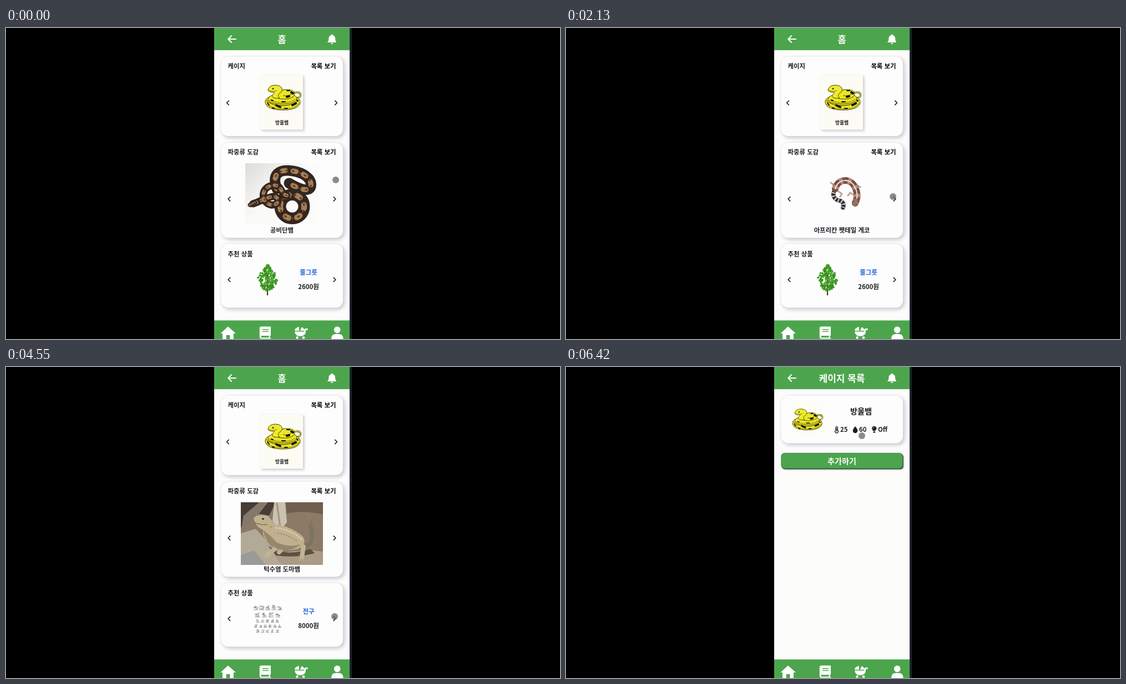
Write an HTML page that moves like this. It is 998 by 561 pixels and loops after 6.46 s.

```html
<!DOCTYPE html>
<html lang="ko">
<head>
<meta charset="utf-8">
<style>
html, body { margin: 0; width: 100%; height: 100%; overflow: hidden; background: #000; }
svg { display: block; }
text { font-family: "Noto Sans CJK KR", "Noto Sans CJK", "Noto Sans", sans-serif; font-weight: 700; }
.line { fill: none; stroke-linecap: round; stroke-linejoin: round; }
.card { fill: #fdfdfd; filter: drop-shadow(3px 3px 3px #bdbdcdb0) drop-shadow(0 0 1px #d4d4d8b0); }
</style>
</head>
<body>
<svg id="stage" width="100%" height="100%" viewBox="0 0 998 561"></svg>
<script>
const GREEN = '#4ca54d', INK = '#1c1c20';
const stage = document.getElementById('stage');

const line = (d, color, w, extra = '') =>
  `<path class="line" d="${d}" stroke="${color}" stroke-width="${w}" ${extra}/>`;
const shape = (d, color) => `<path d="${d}" fill="${color}"/>`;
const oval = (x, y, rx, ry, color, turn = 0) =>
  `<ellipse cx="${x}" cy="${y}" rx="${rx}" ry="${ry}" fill="${color}" transform="rotate(${turn} ${x} ${y})"/>`;
const rect = (x, y, w, h, color, r = 0, extra = '') =>
  `<rect x="${x}" y="${y}" width="${w}" height="${h}" rx="${r}" fill="${color}" ${extra}/>`;
const card = (y, h) => rect(387.5, y, 219.5, h, '#fdfdfd', 13, 'class="card"');
// y is the optical middle of the line
const text = (s, x, y, anchor = 'middle', size = 11.4, color = INK) =>
  `<text x="${x}" y="${y + size * .38}" font-size="${size}" text-anchor="${anchor}" fill="${color}">${s}</text>`;
const arrows = (l, r, y) =>
  line(`M${l + 1.8} ${y - 3.6}l-3.7 3.6 3.7 3.6M${r - 1.8} ${y - 3.6}l3.7 3.6 -3.7 3.6`, INK, 1.6);
const group = (id, body) => `<g id="${id}">${body}</g>`;
const photo = (x, y, w, h, body) =>
  `<svg x="${x}" y="${y}" width="${w}" height="${h}" viewBox="${x} ${y} ${w} ${h}">${body}</svg>`;

let seed = 7;
const rand = () => (seed = seed * 16807 % 2147483647) / 2147483647;

// Yellow rattlesnake drawing
const inked = (d, color = '#ebe522') =>
  `<path d="${d}" fill="${color}" stroke="#2c2c0c" stroke-width=".9" stroke-linejoin="round"/>`;
const snake =
  line('M517 126Q531 128 531 120Q528 114 518 117', '#55520f', 3) +
  line('M517 126Q531 128 531 120Q528 114 518 117', '#d9d54a', 1.7) +
  inked('M467 133C468 123 484 121 499 121C518 121 529 125 530 133C530 143 517 148 499 148C480 148 467 143 467 133Z') +
  line('M470 138Q482 147 505 146Q522 145 528 136', '#a8a11a', 2) +
  line('M469 131Q480 141 500 140Q521 139 527 129', '#2c2c0c', 1) +
  inked('M472 128C473 121 487 119 502 119C515 119 524 122 524 127C523 134 512 137 498 137C482 137 472 134 472 128Z') +
  line('M475 130Q486 135 500 134.5Q515 134 521 128', '#a8a11a', 1.5) +
  inked('M488 122C488 115 496 111 506 111C516 111 521 115 520 120C518 126 508 129 499 128C492 128 488 126 488 122Z') +
  inked('M472 112C473 105 481 102 489 103.5C497 105 500 111 495 116C490 119 489 122 493 127L482 126C477 122 481 119 484 116C480 116 473 116 472 112Z', '#f0ea2c') +
  oval(481, 109.5, 1.5, 1.3, '#181808') + line('M473 113Q481 115.5 488 113', '#554f10', .7) +
  line('M500 122Q508 124 514 119', '#2c2c0c', .9) +
  line('M487 139.5l7 3M516 139l6 -3M506 124l4 -1M514 116l3 2', '#11120a', 4) +
  line('M471 135l3 4M480 144l3 1M502 145l5 0M524 130l2 2M478 130l3 1M497 133l6 0M506 113l5 0', '#11120a', 2) +
  line('M524 115l6 6M528 114l3 5', '#5f5a14', .6);

const python =
  `<defs><linearGradient id="haze" x2="1" y2=".9"><stop stop-color="#dddcd8"/><stop offset=".5" stop-color="#fbfbfa"/></linearGradient></defs>` +
  rect(431, 244, 132, 109, 'url(#haze)') +
  [['M488 290C478 264 492 256 509 257C536 259 552 272 549 286C546 296 530 292 510 280', 19],
   ['M494 322A21 21 0 0 1 537 322A21 21 0 0 1 494 322', 21],
   ['M506 302C494 300 498 281 479 284C459 288 458 314 477 319C494 321 494 303 480 304C466 307 460 312 445 317', 13]]
    .map(([d, w]) => line(d, '#33261f', w) +
      line(d, '#a77d54', w * .48, `stroke-dasharray="${w * .3} ${w * .72}"`) +
      line(d, '#5b4030', w * .16, `stroke-dasharray="2 ${w * .5}"`)).join('') +
  oval(444, 317.5, 9, 5, '#3b2b23', -22) + line('M438 320l11 -6', '#96704b', 2);

const monitorBody = 'M449 304Q466 306 480 299C493 289 509 297 527 280Q542 269 561 271';
const monitor = photo(423, 245, 148, 111,
  rect(423, 245, 148, 111, '#dfe6ee') +
  shape('M423 245H571V290H490L478 286H423Z', '#8d6c32') +
  shape('M490 245H571V262L545 256L518 262L486 258Z', '#3b3a33') +
  oval(515, 270, 34, 12, '#a27f39', -14) + oval(480, 254, 16, 7, '#b18a3c', 10) +
  oval(442, 266, 21, 13, '#76993f') + oval(470, 273, 16, 10, '#8aa04d') + oval(440, 250, 20, 5, '#4a4a28') +
  shape('M423 286H484L470 306L440 314L423 316Z', '#f0efea') +
  shape('M423 322L446 312L474 318L492 338L476 356H423Z', '#b0705c') +
  shape('M463 294L491 278L526 280L549 276L571 284V340L549 346L526 336L510 316L487 320Z', '#b77360') +
  shape('M509 308L536 302L571 314V340L549 346L526 336Z', '#96594a') +
  shape('M426 331L447 317L466 326L447 338Z', '#c68b78') +
  shape('M436 348L468 337L484 340L474 356H430Z', '#91564a') +
  line('M481 306L485 326L479 336M511 293L526 306L535 307M469 308L462 319', '#846b4c', 6) +
  line(monitorBody, '#6f583d', 11) +
  line('M476 302C490 291 507 297 523 284', '#6f583d', 17) +
  line('M474 302C490 291 507 297 526 283', '#b59b6c', 11, 'stroke-dasharray="1 5.5" style="stroke-linecap:butt"') +
  line(monitorBody, '#a48a5f', 5, 'stroke-dasharray="2 3" style="stroke-linecap:butt"') +
  shape('M433 299L442 292L458 298L460 309L441 307Z', '#97794f') + oval(443, 298, 1.2, 1.2, '#1c1712'));

const geckoBody = 'M485 290C490 271 513 270 521 288C527 301 524 309 521 316';
const geckoTail = 'M485 291C477 303 485 311 495 312Q502 316 499 324';
const gecko =
  line('M485 285L477 279M488 293L497 299L494 304M517 279L530 287M521 303L512 297L508 302', '#c3a497', 3) +
  line(geckoTail, '#37303b', 7.5) +
  line(geckoTail, '#d9d3d2', 7, 'stroke-dasharray="2 4" style="stroke-linecap:butt"') +
  line(geckoBody, '#735047', 12) +
  line(geckoBody, '#b98a76', 11, 'stroke-dasharray="6 9" style="stroke-linecap:butt"') +
  line(geckoBody, '#f2e3dc', 2) +
  oval(521, 314, 5, 7, '#9a6f5d', 15) + oval(517, 313, 1, 1, '#1b1515');

const dragonTail = 'M524 324Q552 327 551 304Q550 290 546 278';
const dragon = photo(423, 244, 148, 113,
  rect(423, 244, 148, 113, '#8d7a66') +
  shape('M504 244H571V266Q540 258 505 264Z', '#705f4f') +
  shape('M423 244H486L474 268L452 264L423 290Z', '#453d36') +
  shape('M428 268L456 244H472L442 282L423 298Z', '#85786a') +
  shape('M483 244H503L506 280L494 296L480 278Z', '#cbc1b1') +
  line('M488 246L494 288', '#a39382', 3) +
  shape('M423 300L450 292L484 329L500 357H423Z', '#b3a997') +
  shape('M423 339L447 331L468 357H423Z', '#9a9b99') +
  shape('M484 340Q520 326 571 333V357H496Z', '#ab9a84') +
  shape('M472 322Q500 344 548 328L556 336Q520 345 486 340Z', '#5c5043') +
  line(dragonTail, '#7d7460', 8) + line('M546 282V270', '#8b816c', 3) +
  line('M480 307L486 327L470 339M519 317L536 324L533 342M500 324L492 334', '#c0b293', 8) +
  line('M470 339l-6 3M470 339l-2 6M470 339l5 5M533 342l-4 7M533 342l4 7', '#c0b293', 2) +
  shape('M446 273Q453 263 473 269L484 284Q514 287 535 306Q543 318 527 328Q494 336 477 318Q460 308 463 294Q449 288 446 273Z', '#bfb18f') +
  shape('M463 294Q478 305 487 316Q507 326 531 320Q515 334 491 329Q466 316 463 294Z', '#96886d') +
  line('M486 290Q513 293 532 311', '#d9cdac', 3, 'stroke-dasharray="1 4"') +
  line('M490 300Q511 303 526 316', '#988a6d', 2, 'stroke-dasharray="1 4"') +
  line('M447 280Q459 286 471 284', '#6f6047', 1.2) + oval(463, 274, 1.9, 1.5, '#2b2117') +
  oval(477, 288, 3, 2, '#c3a04b'));

let leaves = '';
for (let i = 0; i < 170; i++) {
  const v = rand(), y = 428 + v * 45;
  const reach = 18 * Math.sin(Math.PI * Math.pow(v * .9 + .04, 1.25));
  leaves += oval(471.5 + (rand() * 2 - 1) * reach, y, 2.6, 1.5,
    ['#34861d', '#459f25', '#56ad30', '#3c9422'][i % 4], rand() * 180);
}
const tree = line('M471 449V481.5', '#50371e', 2.2) + line('M471 476L463 464M471 474L481 462', '#50371e', 1) + leaves;

let kibble = '';
for (let i = 0; i < 34; i++) {
  const a = rand() * 6.28, r = Math.sqrt(rand());
  kibble += oval(472 + Math.cos(a) * r * 14, 446 + Math.sin(a) * r * 5, 1.6, 1.2, ['#ca7c3a', '#9e5125', '#b96731'][i % 3]);
}
const bowl = rect(441.5, 423.5, 60.5, 60.5, '#eeeeee') +
  shape('M456 446H488L491 461Q491 468 472 468Q463 468 462 465Q460 460 452 463Q451 460 453 457Z', '#82d4c6') +
  shape('M456 449Q472 457 488 449L489 454Q472 460 454 455Z', '#a2e2d7') +
  oval(472, 447, 16, 6, '#69b9ad') + shape('M457 447Q463 440 472 439Q483 440 487 447Q480 454 472 453Q463 453 457 447Z', '#a9592a') + kibble;

// Sheet of small sketches: left, middle y, count, spacing, size
const sheet = [[446, 434, 5, 10.8, 8], [449, 447, 4, 12.3, 8], [451, 458, 5, 8.8, 5],
               [447.5, 467, 6, 8.6, 5], [451, 476, 5, 8.8, 5]].map(([x, y, n, gap, size]) => {
  let d = '';
  for (let i = 0; i < n; i++) {
    const px = x + i * gap;
    const at = () => `${(px + rand() * size).toFixed(1)} ${(y + (rand() - .5) * size).toFixed(1)}`;
    d += `M${px} ${y + size / 2}h${size}`;
    for (let k = 0; k < size; k++) d += `M${at()}L${at()}`;
  }
  return line(d, '#85858a', .8);
}).join('');

const reptiles = [[python, '공비단뱀'], [monitor, '액키 모니터'], [gecko, '아프리칸 펫테일 게코'], [dragon, '턱수염 도마뱀']];
const goods = [[tree, '물그릇', 2600], [bowl, '선인장', 9500], [sheet, '전구', 8000]];

const home = text('홈', 497, 20.5, 'middle', 16.5, '#fff') +
  card(51.5, 143.5) + card(207, 171.5) + card(389.5, 115) +
  text('케이지', 399.5, 69, 'start') + text('목록 보기', 594.5, 69, 'end', 11.4, '#000') +
  text('파충류 도감', 399.5, 224, 'start') + text('목록 보기', 594.5, 224, 'end', 11.4, '#000') +
  text('추천 상품', 399.5, 407.5, 'start') +
  rect(459, 85.5, 76, 98, '#fcfcf4', 0, 'style="filter:drop-shadow(2.5px 2.5px 2px #a4a4aea0)"') +
  snake + text('방울뱀', 497, 170.5, 'middle', 8.7) +
  reptiles.map(([art, name], i) => group('reptile' + i, art + text(name, 497, 364.5))).join('') +
  goods.map(([art, name, price], i) => group('good' + i,
    art + text(name, 545, 441, 'middle', 11.4, '#1965df') + text(price + '원', 545, 467))).join('') +
  arrows(399.5, 594.5, 135) + arrows(402, 592, 308.5) + arrows(402, 592, 454);

const list = text('케이지 목록', 497, 20.5, 'middle', 17, '#fff') + card(51.5, 86) +
  rect(407, 66, 57, 57, '#fdfdf5') + `<g transform="translate(12.9 -11.5) scale(.846)">${snake}</g>` +
  text('방울뱀', 531.5, 79.5, 'middle', 14.1) +
  line('M485.8 114V109.5a1.8 1.8 0 0 1 3.6 0V114a2.9 2.9 0 1 1 -3.6 0Z', INK, 1.3) + line('M487.6 110.5V116', INK, 1.4) +
  text('25', 494, 113, 'start') +
  shape('M521 107Q525.3 112 525.3 115A4.3 4.2 0 0 1 516.7 115Q516.7 112 521 107Z', INK) + text('60', 528, 113, 'start') +
  shape('M551 111A4.2 4.2 0 0 1 559.4 111Q559 113 557 115.3H553.4Q551.4 113 551 111ZM553.4 116.2H557V118Q555.2 120 553.4 118Z', INK) +
  line('M553 111Q553.2 109.2 555 109', '#fff', .7) + text('Off', 562, 113, 'start') +
  rect(388.5, 156, 219, 28.3, '#1e3322', 6, 'style="filter:drop-shadow(1px 1px 1px #99a)"') +
  rect(387.8, 155.3, 218.7, 27.8, GREEN, 6, 'stroke="#347a39" stroke-width=".8"') +
  text('추가하기', 497, 169.5, 'middle', 14.1, '#fff');

const bars = rect(375, 0, 244, 40, GREEN) + rect(375, 527.5, 244, 34, GREEN) +
  line('M414 20H400.5M406 14.2L400.2 20L406 25.8', '#fff', 2.2) +
  shape('M586 13V11.5H588.4V13Q593 14 593 19Q593 23 595 25V26H579.4V25Q581.4 23 581.4 19Q581.4 14 586 13ZM585 27H589.4Q589 29 587.2 29Q585.4 29 585 27Z', '#fff') +
  shape('M400 538.5L414 551H410V561H403.5V554H396.7V561H390V551H386.5Z', '#fff') +
  shape('M460 538.5H477V555H475.5V558.5H477V560.5H460Q456.8 560.5 456.8 557V542Q456.8 538.5 460 538.5ZM460 555.2Q458.5 557 460 558.5H473.5V555.2Z', '#fff') +
  line('M462.5 544H472.5M462.5 547.5H472.5', GREEN, 1.4) +
  shape('M528 539V546H520Q520 541 528 539ZM520 547.5H537V546Q537 542 540 542H543.5V545H540V548Q539 556 530 556Q521 556 520 547.5Z', '#fff') +
  shape('M529.5 546L533 539.5Q537 541 537.5 546Z', '#fff') + oval(524.5, 558.5, 2.3, 2.3, '#fff') + oval(536, 558.5, 2.3, 2.3, '#fff') +
  oval(596.7, 544.5, 5.8, 5.9, '#fff') + shape('M586 561Q586 552 594 552H599.5Q607.5 552 607.5 561Z', '#fff');

stage.innerHTML = rect(0, 0, 998, 561, '#000') + rect(619, 0, 4, 561, '#1c222b') +
  rect(375, 0, 244, 561, '#fcfcfb') + bars + group('home', home) + group('list', list) +
  `<circle id="touch" r="6" fill="#666" opacity=".76"/>`;

const LOOP = 6460, LIST_AT = 5620;
const reptileTimes = [0, 840, 1600, 2260], goodTimes = [0, 3160, 4060];
const path = [[0, 594, 274], [600, 589, 304], [2250, 589, 304], [2590, 594, 438], [2900, 592, 450],
              [4560, 592, 450], [5260, 563, 78], [5720, 563, 78], [6300, 533, 124], [LOOP, 533, 124]];
const touch = document.getElementById('touch');
const show = (id, on) => document.getElementById(id).style.display = on ? '' : 'none';
const pick = (name, times, t) => times.forEach((at, i) => show(name + i, t >= at && t < (times[i + 1] ?? LOOP)));

function draw() {
  const t = performance.now() % LOOP;
  show('home', t < LIST_AT);
  show('list', t >= LIST_AT);
  pick('reptile', reptileTimes, t);
  pick('good', goodTimes, t);
  const i = path.findIndex(p => p[0] > t), [t0, x0, y0] = path[i - 1], [t1, x1, y1] = path[i];
  const u = (t - t0) / (t1 - t0), e = u * u * (3 - 2 * u);
  touch.setAttribute('cx', x0 + (x1 - x0) * e);
  touch.setAttribute('cy', y0 + (y1 - y0) * e);
  requestAnimationFrame(draw);
}
draw();
</script>
</body>
</html>
```
